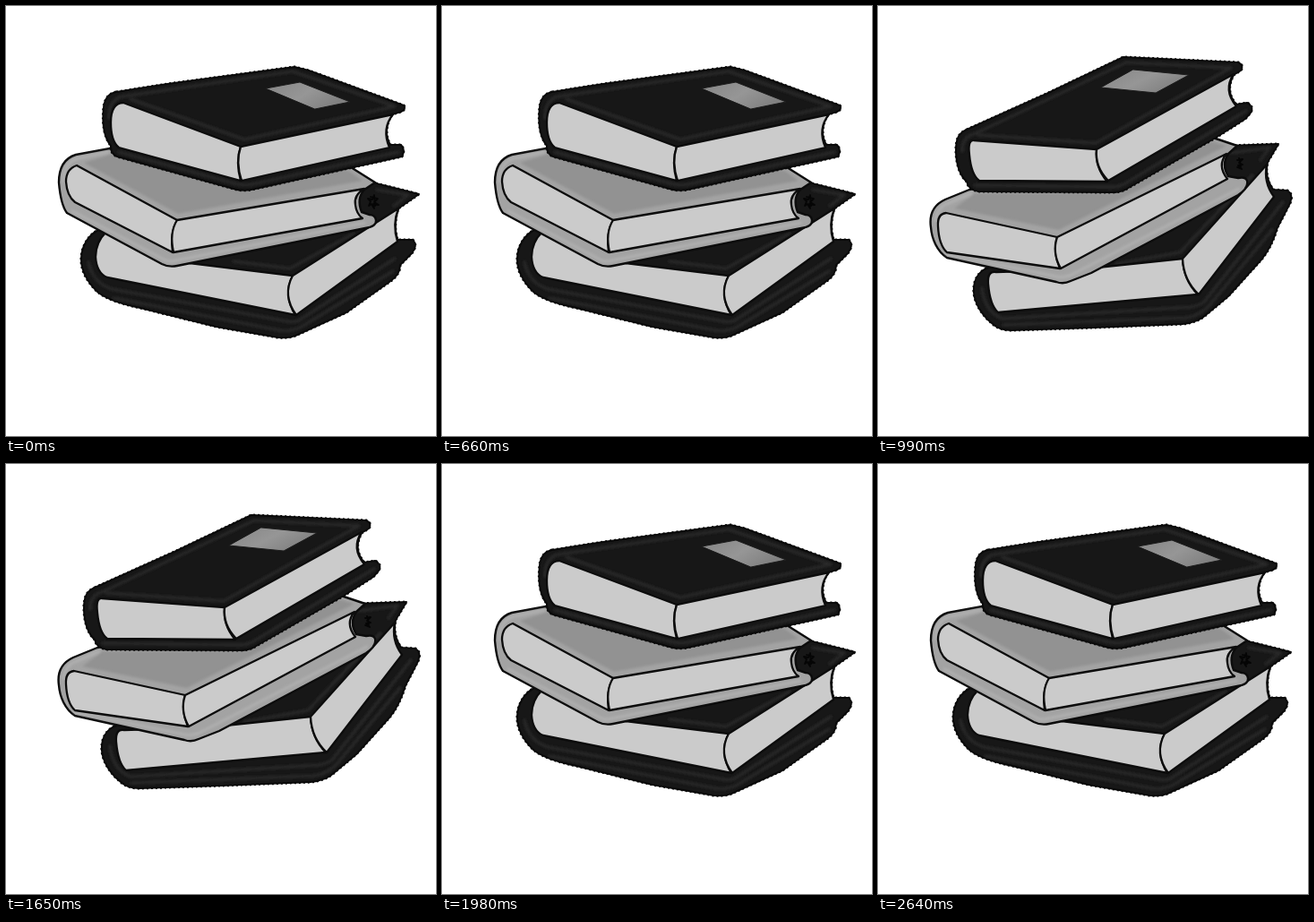
An HTML page that plays this animation: 480x480 px, repeating every 2970 ms.

```html
<!DOCTYPE html>
<html lang="en">
<head>
<meta charset="utf-8">
<title>Stack of books</title>
<style>
html, body { margin: 0; width: 100%; height: 100%; overflow: hidden; background: #fff; }
svg { display: block; width: 100vw; height: 100vh; }
path { stroke-linejoin: round; stroke-linecap: round; }
.dark { fill: #171717; stroke: #0a0a0a; stroke-width: 2; }
.gray { fill: #a3a3a3; stroke: #0c0c0c; stroke-width: 2.4; }
.face { fill: #929292; filter: url(#soft); }
.page { fill: #cbcbcb; stroke: #0c0c0c; stroke-width: 2.3; }
.label { fill: url(#tag); stroke: #1c1c1c; stroke-width: 1; }
.sheen { fill: none; stroke: #292929; stroke-width: 3; filter: url(#soft); }
.glow { fill: none; stroke: #b3b3b3; stroke-width: 2.5; filter: url(#soft); }
.ink { fill: none; stroke: #050505; stroke-width: 1.8; }
.rough { fill: none; stroke: #0a0a0a; stroke-width: 3; stroke-dasharray: 2 3; stroke-linecap: butt; }
</style>
</head>
<body>
<svg viewBox="0 0 480 480" id="stage">
  <defs>
    <filter id="soft" x="-10%" y="-10%" width="120%" height="120%"><feGaussianBlur stdDeviation="1.5"/></filter>
    <linearGradient id="tag" x1="0" y1="0" x2="1" y2="0.5">
      <stop offset="0" stop-color="#858585"/><stop offset="0.55" stop-color="#969696"/><stop offset="1" stop-color="#808080"/>
    </linearGradient>
  </defs>
</svg>
<script>
// Each pose lists its parts from the bottom book up.
const poses = [
  [
    ['dark rough', 'M105 249C92 255 84 268 84 283C84 297 91 308 102 319C112 327 130 333 150 337L235 358L298 369Q312 372 323 368L380 342L428 308Q440 300 440 289L453 276Q460 267 454 261L437 261Q432 244 438 226L461 210L405 196L230 240Z'],
    ['sheen', 'M92 286Q97 309 118 316L314 352Q323 354 330 349L434 282 M254 285L317 293L388 254 M120 326L300 361Q316 365 330 358L432 296 M414 205L449 211L433 223'],
    ['page', 'M112 252Q100 264 100 280Q101 298 113 303L323 345Q309 323 320 301L205 287Z'],
    ['page', 'M320 301L438 226Q431 244 437 263L324 345Q308 323 320 301Z'],
    ['ink', 'M407 213l8 2l-4 4l5 3l-6 -1l1 5l-3 -5l-3 2l2 -5l-3 -3l5 1l2 -5l1 12'],
    ['gray', 'M116 159L78 166C65 170 59 181 59 197C60 209 62 223 68 231L174 288Q182 292 191 290L401 248Q414 246 413 239Q412 233 406 233L397 230Q391 215 400 205L412 197L385 180Z'],
    ['face', 'M87 175L118 165L383 184L398 195L192 232Z'],
    ['glow', 'M64 196Q64 175 80 170L114 163 M74 229L178 284Q184 286 190 284L400 242'],
    ['page', 'M79 178Q67 182 67 196Q68 212 77 219L186 275Q183 254 191 239Z'],
    ['page', 'M191 239L400 204Q388 211 390 222Q391 232 398 237L187 275Q182 253 191 239Z'],
    ['dark rough', 'M123 96L180 87L322 68L338 72L444 111Q447 115 441 118L431 121Q420 139 429 155L441 155Q446 161 442 168L274 205Q264 207 254 204L124 168Q116 164 117 156C110 147 107 132 109 113Q111 98 123 96Z'],
    ['sheen', 'M115 125Q115 104 130 101L320 73L434 112L266 149L139 104 M126 163L255 198Q265 201 275 199L438 163'],
    ['label', 'M290 92L328 85L384 107L345 115Z'],
    ['page', 'M131 108Q117 108 117 130Q117 151 126 158L262 195Q256 174 262 157Z'],
    ['page', 'M262 157L432 121Q419 137 428 158L263 195Q256 174 262 157Z'],
  ],
  [
    ['dark rough', 'M126 291C112 295 106 306 107 320C108 332 116 345 127 354Q135 362 149 362L240 359L340 355Q358 353 367 344L391 324L428 283Q439 270 446 247L460 220Q464 210 457 206L441 205Q431 190 435 174L447 154L390 156L240 240Z'],
    ['sheen', 'M116 315Q119 341 139 349L349 336Q359 335 365 329L452 219 M266 288L337 275L418 189 M140 356L344 348Q359 346 370 334L440 250 M394 164L437 158L427 172'],
    ['page', 'M132 297Q122 295 123 310Q125 334 134 342L357 322Q341 306 340 282L225 294Z'],
    ['page', 'M340 282L434 177Q430 197 442 213L358 322Q341 306 340 282Z'],
    ['ink', 'M401 172l6 -1l-4 4l4 2l-5 1l4 4l-5 -2M403 170l2 9'],
    ['gray', 'M102 205L75 216C62 222 57 233 59 247C60 260 66 274 77 281L199 308Q207 311 215 307L238 298L402 211Q414 203 412 195Q410 190 402 192L391 190Q383 177 391 165L401 156L374 147Z'],
    ['face', 'M85 226L108 209L263 208L371 151L389 156L202 250Z'],
    ['glow', 'M64 240Q66 224 79 220L104 209 M77 277L199 302Q207 304 216 300L403 204'],
    ['page', 'M76 231Q66 232 67 246Q68 267 77 275L203 293Q195 275 200 258Z'],
    ['page', 'M200 258L389 165Q378 178 390 193L204 293Q194 275 200 258Z'],
    ['dark rough', 'M99 138L188 98L274 57L402 63Q409 66 405 72L397 77Q387 95 400 110L412 108Q420 112 416 119L410 126L377 147L276 205Q270 208 260 208L112 207Q101 205 99 196C91 189 87 175 87 161C87 148 90 142 99 138Z'],
    ['sheen', 'M94 162Q94 146 107 143L277 63L394 69L243 153L112 144 M108 200L260 202Q270 202 278 197L411 117'],
    ['label', 'M285 71L347 77L310 97L249 91Z'],
    ['page', 'M107 150Q100 149 102 166Q104 188 113 195L256 196Q242 180 244 160Z'],
    ['page', 'M244 160L397 76Q385 94 400 112L257 195Q242 180 244 160Z'],
  ],
];

const stage = document.getElementById('stage');
const STEP = 330, STEPS = 9;

function add(parent, tag, attrs = {}) {
  const el = document.createElementNS('http://www.w3.org/2000/svg', tag);
  for (const key in attrs) el.setAttribute(key, attrs[key]);
  return parent.appendChild(el);
}

const groups = poses.map(parts => {
  const group = add(stage, 'g');
  for (const [kind, d] of parts) {
    const [fill, edge] = kind.split(' ');
    if (edge) add(group, 'path', { class: edge, d });
    add(group, 'path', { class: fill, d });
  }
  return group;
});

// The poses alternate; the last step and the first share one pose.
groups.forEach((group, pose) => {
  const frames = [];
  for (let i = 0; i <= STEPS; i++) {
    const step = Math.min(i, STEPS - 1);
    frames.push({ opacity: step % 2 === pose ? 1 : 0, offset: i / STEPS, easing: 'steps(1, end)' });
  }
  group.animate(frames, { duration: STEP * STEPS, iterations: Infinity });
});
</script>
</body>
</html>
```
